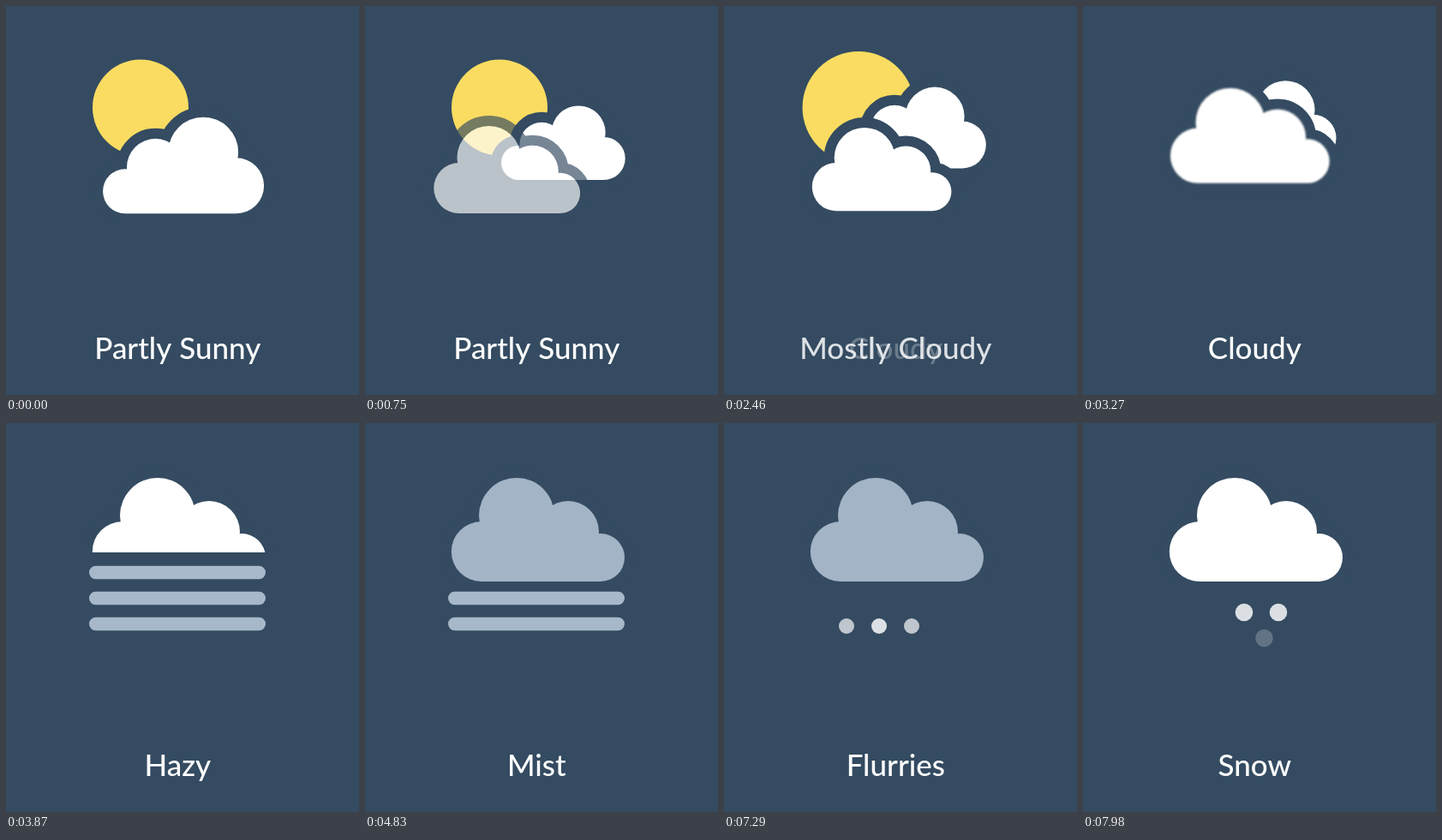
Recreate the animation shown at these times as an HTML page with a canvas. Size 412 px wide and 454 px high, loop 8000 ms.

```html
<!DOCTYPE html>
<html lang="en">
<head>
<meta charset="utf-8">
<title>Weather icons</title>
<style>
  html, body { margin: 0; width: 100%; height: 100%; overflow: hidden; background: #344b61; }
  canvas { display: block; width: 412px; height: 454px; }
</style>
</head>
<body>
<canvas id="stage" width="412" height="454"></canvas>
<script>
const W = 412, H = 454, LOOP = 8000;
const stage = document.getElementById('stage');
const ctx = stage.getContext('2d');
const layer = stage.cloneNode();
const pen = layer.getContext('2d');
const BG = '#344b61', SUN = '#f9dc61', BAR = '#a7b8ca', RAIN = '#68b9e9';
const WHITE = [255, 255, 255], GRAY = [164, 180, 199];

const lerp = (a, b, p) => a + (b - a) * p;
const phase = (t, start, dur) => Math.min(1, Math.max(0, (t - start) / dur));
const smooth = p => p * p * (3 - 2 * p);
const inBack = (p, c) => p * p * ((c + 1) * p - c);
const outBack = (p, c) => 1 - inBack(1 - p, c);
const rgb = c => `rgb(${c.map(Math.round).join()})`;

// Cloud poses: start, duration, centre x, centre y, scale
const FRONT = [
  [0, 1, 133, 191, .845],
  [630, 600, 181.2, 191, .845],
  [2280, 570, 184.5, 190.5, .8],
  [3150, 720, 202, 124.5, 1]
];
const BACK = [
  [0, 1, 207, 186, .93],
  [630, 600, 242.7, 147.3, .615],
  [1500, 330, 231, 133, .73],
  [2280, 570, 226, 143, .79],
  [3150, 720, 211, 128, .765]
];
const LABELS = [
  ['Partly Sunny', -400], ['Partly Cloudy', 780], ['Mostly Cloudy', 1500],
  ['Cloudy', 2400], ['Hazy', 3300], ['Mist', 4300], ['Rain', 5250],
  ['Sleet', 5880], ['Flurries', 6780], ['Snow', 7500]
];
const FADE = 300;

// Lobes relative to the cloud centre: x, y, radius
const LOBES = [[-66.2, 25.5, 35], [-25, -16.5, 44], [35, 2.5, 36], [73, 32.5, 28]];

function pose(t, keys) {
  let v = keys[0].slice(2);
  for (const [start, dur, ...to] of keys.slice(1)) {
    const p = outBack(phase(t, start, dur), 1.5);
    v = v.map((n, i) => lerp(n, to[i], p));
  }
  return v;
}

function cloudPath([x, y, s], dir) {
  pen.beginPath();
  for (const [lx, ly, r] of LOBES) {
    const cx = x + dir * lx * s, cy = y + ly * s;
    pen.moveTo(cx + r * s, cy);
    pen.arc(cx, cy, r * s, 0, 7);
  }
  pen.rect(x + (dir > 0 ? -66.2 : -73) * s, y + 5 * s, 139.2 * s, 55.5 * s);
}

// Painted on its own layer so that a fading cloud stays one flat shape
function cloud(at, dir, color, alpha = 1, soft = 0) {
  pen.clearRect(0, 0, W, H);
  cloudPath(at, dir);
  pen.strokeStyle = BG;
  pen.lineWidth = 24;
  pen.lineJoin = 'round';
  pen.stroke();
  pen.fillStyle = BG;
  pen.fill();
  pen.filter = soft ? `blur(${soft}px)` : 'none';
  pen.fillStyle = color;
  pen.fill();
  pen.filter = 'none';
  ctx.globalAlpha = alpha;
  ctx.drawImage(layer, 0, 0);
  ctx.globalAlpha = 1;
}

function dot(x, y, r, alpha, color = '#fff') {
  ctx.globalAlpha = alpha;
  ctx.fillStyle = color;
  ctx.beginPath();
  ctx.arc(x, y, r, 0, 7);
  ctx.fill();
  ctx.globalAlpha = 1;
}

function clipRows(top, bottom) {
  ctx.beginPath();
  ctx.rect(0, top, W, bottom - top);
  ctx.clip();
}

function drawSky(t) {
  const r = 56 * (1 - inBack(phase(t, 2280, 500), 2.6));
  if (r > 0) dot(157, 118.5, r, 1, SUN);
  if (t < 3700) cloud(pose(t, BACK), -1, '#fff');

  const at = pose(t, FRONT);
  const cut = lerp(lerp(260, 151, smooth(phase(t, 3350, 350))), 186, smooth(phase(t, 4200, 400)));
  const gray = smooth(phase(t, 4200, 500));
  const rise = phase(t, 3150, 500);
  ctx.save();
  clipRows(0, cut);
  const color = rgb(WHITE.map((n, i) => lerp(n, GRAY[i], gray)));
  cloud(at, 1, color, phase(t, 630, 180), 1.6 * Math.sin(Math.PI * rise));
  ctx.restore();

  const wipe = phase(t, 7800, 180) ** 1.5;
  if (wipe > 0) {
    ctx.save();
    clipRows(186 - 123 * wipe, 186);
    cloud(at, 1, '#fff');
    ctx.restore();
  }
}

function drawBars(t) {
  for (let i = 0; i < 3; i++) {
    const grow = outBack(phase(t, 3390 + 60 * i, 360), 1.2);
    const leave = i ? phase(t, 5070 + 60 * (i - 1), 330) : phase(t, 4200, 400);
    const w = 206 * grow * (1 - inBack(leave, 1.2));
    if (w <= 0) continue;
    const h = Math.min(15.5, w);
    ctx.fillStyle = BAR;
    ctx.beginPath();
    ctx.roundRect(200 - w / 2, 174.6 + 30 * i - h / 2, w, h, h / 2);
    ctx.fill();
  }
}

// A drop grows along its slant, then slides off and fades
function drop(t, col, enter, exit) {
  const grow = smooth(phase(t, enter, 200)), out = phase(t, exit, 130);
  if (!grow || out === 1) return;
  const x = 162 + 38 * col - 16 * out, y = 207.5 + 28 * out;
  ctx.globalAlpha = Math.min(1, grow * 3) * (1 - out ** 1.2);
  ctx.strokeStyle = RAIN;
  ctx.lineWidth = 16;
  ctx.lineCap = 'round';
  ctx.beginPath();
  ctx.moveTo(x, y);
  ctx.lineTo(x - 26 * grow, y + 44.5 * grow);
  ctx.stroke();
  ctx.globalAlpha = 1;
}

function flake(t, x, y, r, enter, dur, exit) {
  const alpha = phase(t, enter, dur) * (1 - phase(t, exit, 180));
  if (alpha > 0) dot(x, y, r, alpha);
}

function drawFall(t) {
  for (let i = 0; i < 3; i++) {
    drop(t, i, 5400 + 120 * i, 6140 - 130 * i);
    if (i !== 1) drop(t, i, 6250 + 15 * i, 6890 - 130 * i);
    flake(t, 143 + 38 * i, 237, 9, i === 1 ? 7000 : 7050, 350, 7440 + 60 * i);
  }
  flake(t, 187, 230, 9, 6260, 200, 6760);
  flake(t, 188, 221, 10.3, 7815, 200, LOOP);
  flake(t, 228, 221, 10.3, 7815, 200, LOOP);
  flake(t, 211.5, 251, 10.3, 7935, 200, LOOP);
}

function drawLabel(t) {
  ctx.font = '500 35px Lato, "Open Sans", sans-serif';
  ctx.textAlign = 'center';
  ctx.fillStyle = '#fff';
  LABELS.forEach(([text, start], i) => {
    const next = LABELS[i + 1];
    const alpha = phase(t, start, FADE) * (1 - (next ? phase(t, next[1], FADE) : 0));
    if (alpha <= 0) return;
    ctx.globalAlpha = alpha ** .8;
    ctx.fillText(text, 200.3, 412);
  });
  ctx.globalAlpha = 1;
}

function draw(now) {
  const t = now % LOOP;
  ctx.fillStyle = BG;
  ctx.fillRect(0, 0, W, H);
  drawSky(t);
  drawBars(t);
  drawFall(t);
  drawLabel(t);
}

let origin;
function tick(now) {
  origin ??= now;
  draw(now - origin);
  requestAnimationFrame(tick);
}
requestAnimationFrame(tick);
</script>
</body>
</html>
```
